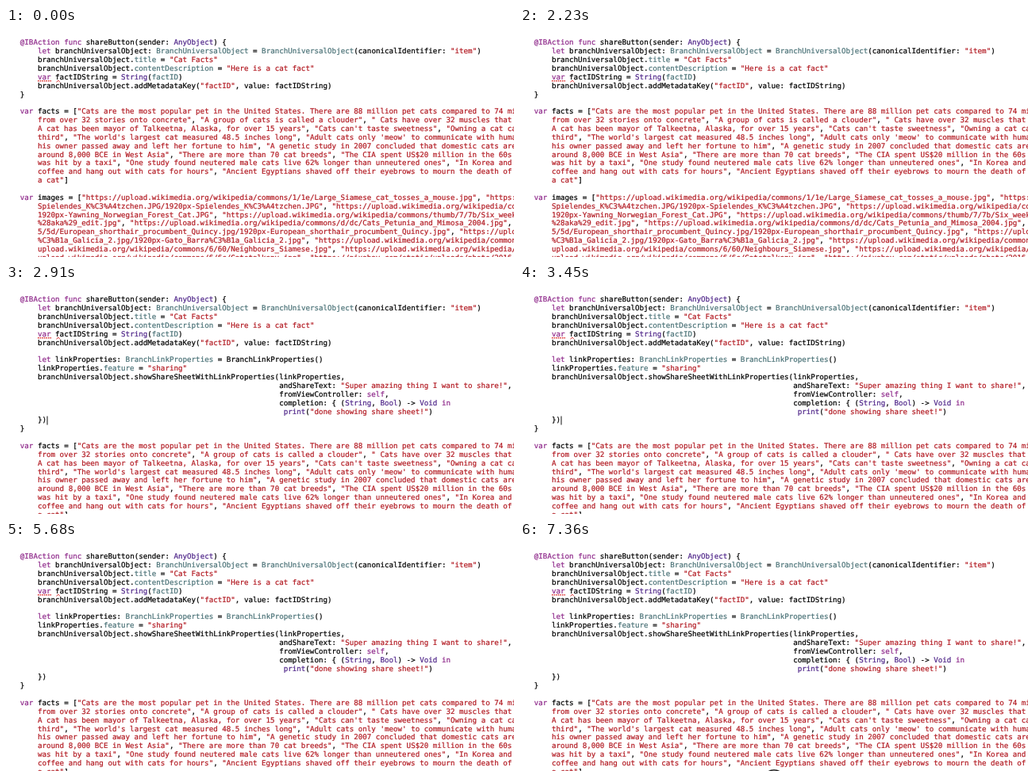
An HTML page for the animation above (7.4 s loop, 640x289 px).

```html
<!DOCTYPE html>
<html lang="en">
<head>
<meta charset="utf-8">
<title>Code editor</title>
<style>
html, body { margin: 0; width: 100%; height: 100%; overflow: hidden; background: #fff; }
svg { display: block; width: 100vw; height: 100vh; }
text { font: 9.205px "DejaVu Sans Mono", "Noto Sans Mono", monospace; white-space: pre; color: #000; text-rendering: geometricPrecision; }
text, tspan { fill: currentColor; stroke: currentColor; stroke-width: .22px; }
.string { color: #b31c24; }
.keyword { color: #8f2a8b; }
.system { color: #50278a; }
.project, .fresh { color: #4c7378; }
.unindexed .fresh { color: #000; }
</style>
</head>
<body>
<svg id="stage" viewBox="0 0 640 289">
  <g id="head"></g>
  <g id="pasted"></g>
  <g id="tail"></g>
  <path d="M40 66.8H57" stroke="#d33" stroke-width="1.5" stroke-dasharray="1.6 1"/>
  <path d="M63.6 68.4L65.8 66L68 68.4" fill="none" stroke="#d33"/>
  <path id="caret" d="M52 165.5V176.5" stroke="#111"/>
  <path id="arrow" d="M0 0V11.5L2.6 9.1L4.4 13L6.3 12.2L4.6 8.4H8.2Z" fill="#111" stroke="#fff" stroke-width=".8"/>
  <path id="beam" d="M-3 -6Q0 -6 0 -4Q0 -6 3 -6M0 -4.5V4.5M-3 6Q0 6 0 4Q0 6 3 6M-1.6 2H1.6" fill="none" stroke="#222" stroke-width="1.1"/>
  <circle id="bubble" cx="320" r="13" fill="#fff" stroke="#222" stroke-width="1.6"/>
</svg>
<script>
const LOOP = 7400, LEFT = 17.8, BASELINE = 21.4, PITCH = 10.86;
const FIRST_RETURN = 2380, SECOND_RETURN = 2470, PASTE = 2500, INDEXED = 3400, BLINK = 860;
const $ = id => document.getElementById(id);
const indent = (n, lines) => lines.map(line => ' '.repeat(n) + line);

const head = [
  '@IBAction func shareButton(sender: AnyObject) {',
  ...indent(4, [
    'let branchUniversalObject: BranchUniversalObject = BranchUniversalObject(canonicalIdentifier: "item")',
    'branchUniversalObject.title = "Cat Facts"',
    'branchUniversalObject.contentDescription = "Here is a cat fact"',
    'var factIDString = String(factID)',
    'branchUniversalObject.addMetadataKey("factID", value: factIDString)'
  ])
];

const pasted = [
  '',
  ...indent(4, [
    'let linkProperties: BranchLinkProperties = BranchLinkProperties()',
    'linkProperties.feature = "sharing"',
    'branchUniversalObject.showShareSheetWithLinkProperties(linkProperties,'
  ]),
  ...indent(59, [
    'andShareText: "Super amazing thing I want to share!",',
    'fromViewController: self,',
    'completion: { (String, Bool) -> Void in',
    ' print("done showing share sheet!")'
  ]),
  '    })'
];

const tail = [
  '}',
  '',
  'var facts = ["Cats are the most popular pet in the United States. There are 88 million pet cats compared to 74 million',
  ...indent(4, [
    'from over 32 stories onto concrete", "A group of cats is called a clouder", " Cats have over 32 muscles that',
    'A cat has been mayor of Talkeetna, Alaska, for over 15 years", "Cats can\'t taste sweetness", "Owning a cat can',
    'third", "The world\'s largest cat measured 48.5 inches long", "Adult cats only \'meow\' to communicate with humans',
    'his owner passed away and left her fortune to him", "A genetic study in 2007 concluded that domestic cats are',
    'around 8,000 BCE in West Asia", "There are more than 70 cat breeds", "The CIA spent US$20 million in the 60s',
    'was hit by a taxi", "One study found neutered male cats live 62% longer than unneutered ones", "In Korea and',
    'coffee and hang out with cats for hours", "Ancient Egyptians shaved off their eyebrows to mourn the death of',
    'a cat"]'
  ]),
  '',
  'var images = ["https://upload.wikimedia.org/wikipedia/commons/1/1e/Large_Siamese_cat_tosses_a_mouse.jpg", "https://',
  ...indent(4, [
    'Spielendes_K%C3%A4tzchen.JPG/1920px-Spielendes_K%C3%A4tzchen.JPG", "https://upload.wikimedia.org/wikipedia/commons/',
    '1920px-Yawning_Norwegian_Forest_Cat.JPG", "https://upload.wikimedia.org/wikipedia/commons/thumb/7/7b/Six_weeks',
    '%28aka%29_edit.jpg", "https://upload.wikimedia.org/wikipedia/commons/d/dc/Cats_Petunia_and_Mimosa_2004.jpg", "',
    '5/5d/European_shorthair_procumbent_Quincy.jpg/1920px-European_shorthair_procumbent_Quincy.jpg", "https://upload',
    '%C3%B1a_Galicia_2.jpg/1920px-Gato_Barra%C3%B1a_Galicia_2.jpg", "https://upload.wikimedia.org/wikipedia/commons/',
    'upload.wikimedia.org/wikipedia/commons/6/60/Neighbours_Siamese.jpg", "https://upload.wikimedia.org/wikipedia/',
    'upload.wikimedia.org/wikipedia/commons/6/6c/Gatotalkeny.jpg", "https://pixabay.com/static/uploads/photo/2016/'
  ])
];

const TOKENS = new RegExp([
  '(?<string>"[^"]*(?:"|$))',
  '(?<keyword>@IBAction|\\b(?:func|let|var|self|in)\\b)',
  '(?<system>\\b(?:AnyObject|String|Bool|Void|print)\\b)',
  '(?<fresh>\\bBranch\\w+(?=\\(\\)))',
  '(?<project>\\bBranch\\w+|\\bfactID\\b|(?<=\\.)(?:title|contentDescription|feature)\\b)'
].join('|'), 'g');

function add(parent, name, attributes = {}, content = '') {
  const node = document.createElementNS('http://www.w3.org/2000/svg', name);
  for (const key in attributes) node.setAttribute(key, attributes[key]);
  node.textContent = content;
  return parent.appendChild(node);
}

// Splits code into coloured runs; strings may continue over line breaks.
function colourRuns(code) {
  const runs = [];
  let end = 0;
  for (const match of code.matchAll(TOKENS)) {
    runs.push(['', code.slice(end, match.index)]);
    runs.push([Object.keys(match.groups).find(key => match.groups[key]), match[0]]);
    end = match.index + match[0].length;
  }
  runs.push(['', code.slice(end)]);
  return runs;
}

function typeset(group, lines, firstRow) {
  let row = firstRow;
  const newLine = () => add(group, 'text', { x: LEFT, y: BASELINE + row++ * PITCH });
  let line = newLine();
  for (const [kind, run] of colourRuns(lines.join('\n'))) {
    run.split('\n').forEach((part, i) => {
      if (i) line = newLine();
      if (part) add(line, 'tspan', { class: kind }, part);
    });
  }
}

const show = (node, visible) => node.setAttribute('visibility', visible ? 'visible' : 'hidden');
const move = (node, x, y) => node.setAttribute('transform', `translate(${x} ${y})`);
const progress = (t, from, to) => Math.min(1, Math.max(0, (t - from) / (to - from)));
const ease = p => p * p * (3 - 2 * p);
const mix = (a, b, p) => a + (b - a) * p;

function draw(t) {
  const isPasted = t >= PASTE;
  const extraRows = isPasted ? pasted.length : (t >= FIRST_RETURN) + (t >= SECOND_RETURN);
  show($('pasted'), isPasted);
  $('pasted').classList.toggle('unindexed', t < INDEXED);
  move($('tail'), 0, extraRows * PITCH);
  show($('caret'), isPasted && (t - PASTE) % BLINK < BLINK / 2);

  const arrive = ease(progress(t, 600, 1000));
  move($('arrow'), mix(642, 415, arrive), mix(150, 74, arrive));
  show($('arrow'), t >= 600 && t < 1600);

  const leave = progress(t, 4150, 4460);
  move($('beam'), mix(415, 348.6, leave), mix(80, 298.5, leave));
  show($('beam'), t >= 4150 && t < 4460);

  $('bubble').setAttribute('cy', mix(304, 300.7, progress(t, 7280, 7360)));
  show($('bubble'), t >= 7280);
}

typeset($('head'), head, 0);
typeset($('pasted'), pasted, head.length);
typeset($('tail'), tail, head.length);

const start = performance.now();
function tick() {
  draw((performance.now() - start) % LOOP);
  requestAnimationFrame(tick);
}
tick();
</script>
</body>
</html>
```
